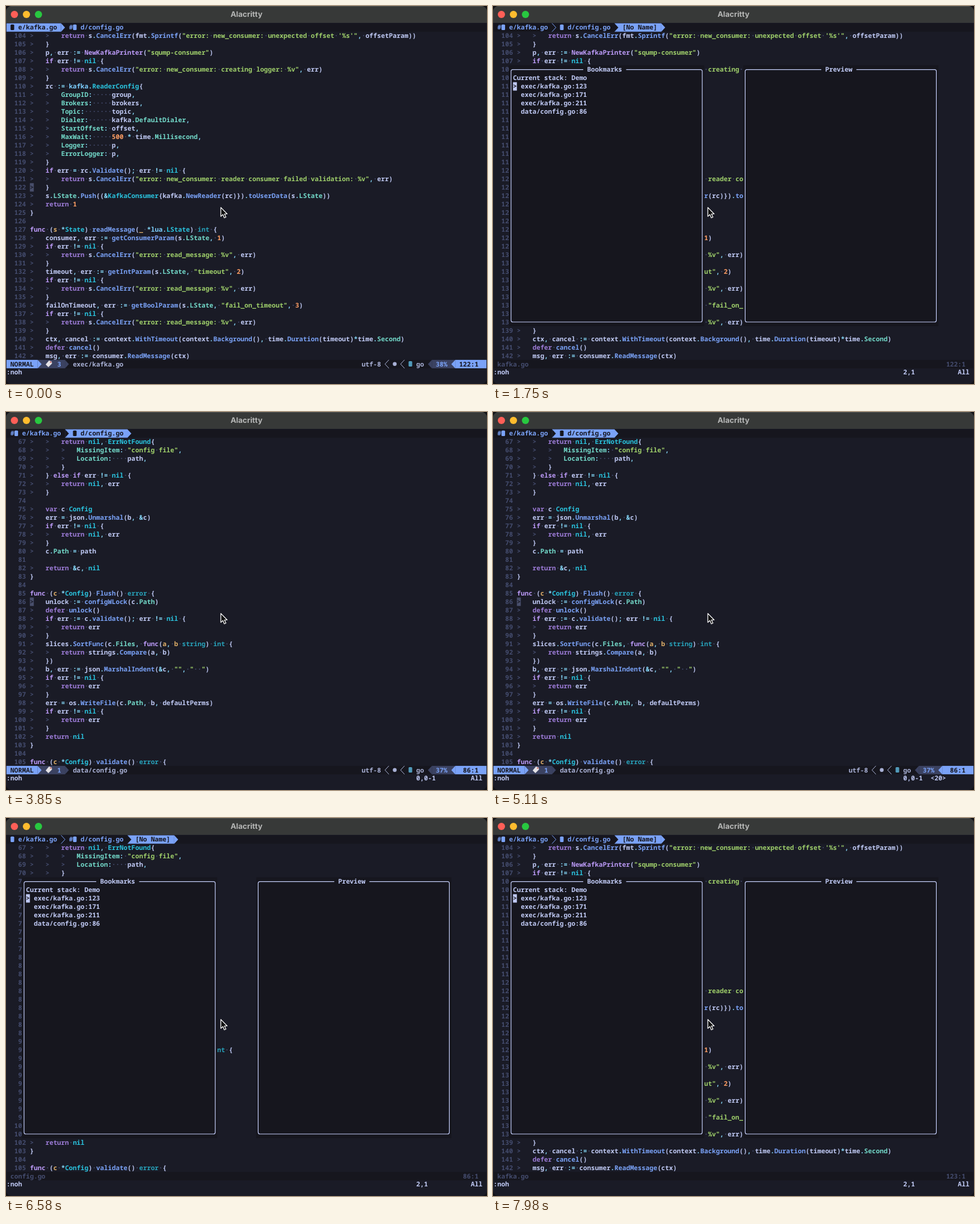
Recreate the animation shown at these times as an HTML page. Size 800x628 px, loop 8000 ms.

```html
<!DOCTYPE html>
<html lang="en">
<head>
<meta charset="utf-8">
<title>Terminal bookmarks</title>
<style>
html, body { margin: 0; width: 100%; height: 100%; overflow: hidden; background: #101014; }
svg { display: block; width: 800px; height: 628px; }
text { white-space: pre; text-rendering: geometricPrecision; }
#screen text { font: 600 10.817px "Noto Sans Mono", "DejaVu Sans Mono", monospace; }
#screen text.b { font-weight: 700; }
#title { font: 700 12.6px Inter, "Open Sans", sans-serif; }
</style>
</head>
<body>
<svg viewBox="0 0 800 628">
  <defs><clipPath id="win"><rect width="800" height="628" rx="9"/></clipPath></defs>
  <g clip-path="url(#win)">
    <rect width="800" height="628" fill="#1a1b26"/>
    <rect width="800" height="28" fill="#373938"/>
    <rect width="800" height="1" fill="#505251"/>
    <circle cx="14" cy="14" r="6" fill="#fe5f57"/>
    <circle cx="34" cy="14" r="6" fill="#febc2e"/>
    <circle cx="54" cy="14" r="6" fill="#28c840"/>
    <text id="title" x="400" y="18.4" text-anchor="middle" fill="#b6b7b6">Alacritty</text>
    <g id="screen"></g>
    <path d="M357.3 334.6V349.6L360.7 346.5L363.1 352L365.8 350.8L363.4 345.5H367.8Z"
      fill="#111" stroke="#fff" stroke-width="1.2" stroke-linejoin="round"/>
  </g>
</svg>
<script>
const CW = 6.49, LH = 13.98, X0 = 0.8, Y0 = 28.7;
const C = {
  bg: '#1a1b26', dark: '#16161e', fg: '#c0caf5', dim: '#3b4261', faint: '#444c6e', cursor: '#484e6b',
  blue: '#7aa2f7', magenta: '#bb9af7', purple: '#9d7cd8', green: '#9ece6a', orange: '#ff9e64',
  type: '#2ac3de', builtin: '#27a1b9', op: '#89ddff', prop: '#73daca',
  param: '#e0af68', module: '#7dcfff', bracket: '#c0caf5', bar: '#a9b1d6', icon: '#519aba'
};

const files = {
  kafka: {
    first: 104, tab: 0, path: 'exec/kafka.go', name: 'kafka.go', marks: 3, percent: '38%',
    code: String.raw`		return s.CancelErr(fmt.Sprintf("error: new_consumer: unexpected offset '%s'", offsetParam))
	}
	p, err := NewKafkaPrinter("sqump-consumer")
	if err != nil {
		return s.CancelErr("error: new_consumer: creating logger: %v", err)
	}
	rc := kafka.ReaderConfig{
		GroupID:     group,
		Brokers:     brokers,
		Topic:       topic,
		Dialer:      kafka.DefaultDialer,
		StartOffset: offset,
		MaxWait:     500 * time.Millisecond,
		Logger:      p,
		ErrorLogger: p,
	}
	if err = rc.Validate(); err != nil {
		return s.CancelErr("error: new_consumer: reader consumer failed validation: %v", err)
	}
	s.LState.Push((&KafkaConsumer{kafka.NewReader(rc)}).toUserData(s.LState))
	return 1
}

func (s *State) readMessage(_ *lua.LState) int {
	consumer, err := getConsumerParam(s.LState, 1)
	if err != nil {
		return s.CancelErr("error: read_message: %v", err)
	}
	timeout, err := getIntParam(s.LState, "timeout", 2)
	if err != nil {
		return s.CancelErr("error: read_message: %v", err)
	}
	failOnTimeout, err := getBoolParam(s.LState, "fail_on_timeout", 3)
	if err != nil {
		return s.CancelErr("error: read_message: %v", err)
	}
	ctx, cancel := context.WithTimeout(context.Background(), time.Duration(timeout)*time.Second)
	defer cancel()
	msg, err := consumer.ReadMessage(ctx)`
  },
  config: {
    first: 67, tab: 1, path: 'data/config.go', name: 'config.go', marks: 1, percent: '37%',
    code: String.raw`		return nil, ErrNotFound{
			MissingItem: "config file",
			Location:    path,
		}
	} else if err != nil {
		return nil, err
	}

	var c Config
	err = json.Unmarshal(b, &c)
	if err != nil {
		return nil, err
	}
	c.Path = path

	return &c, nil
}

func (c *Config) Flush() error {
	unlock := configWLock(c.Path)
	defer unlock()
	if err := c.validate(); err != nil {
		return err
	}
	slices.SortFunc(c.Files, func(a, b string) int {
		return strings.Compare(a, b)
	})
	b, err := json.MarshalIndent(&c, "", "  ")
	if err != nil {
		return err
	}
	err = os.WriteFile(c.Path, b, defaultPerms)
	if err != nil {
		return err
	}
	return nil
}

func (c *Config) validate() error {`
  }
};

// start ms, file, cursor line, popup row (0 = closed), ruler, right end of the command line
const steps = [
  [0, 'kafka', 122, 0, '', ''],
  [1120, 'kafka', 122, 0, '', '<20>'],
  [1260, 'kafka', 122, 2],
  [2170, 'kafka', 122, 3],
  [2940, 'kafka', 122, 4],
  [3150, 'kafka', 122, 5],
  [3850, 'config', 86, 0, '0,0-1', 'All'],
  [5110, 'config', 86, 0, '0,0-1', '<20>'],
  [5250, 'config', 86, 5],
  [6020, 'config', 86, 4],
  [6300, 'config', 86, 3],
  [6580, 'config', 86, 2],
  [6930, 'kafka', 123, 0, '0,0-1', 'All'],
  [7700, 'kafka', 123, 0, '0,0-1', '<20>'],
  [7840, 'kafka', 123, 2]
];
const LOOP = 8000;

const px = col => +(X0 + col * CW).toFixed(2);
const py = row => +(Y0 + row * LH).toFixed(2);
const esc = s => s.replace(/&/g, '&amp;').replace(/</g, '&lt;').replace(/>/g, '&gt;');

const text = (row, col, s, fill = C.fg, cls = '') =>
  `<text x="${px(col)}" y="${(py(row) + 10.6).toFixed(2)}" fill="${fill}" class="${cls}">${esc(s)}</text>`;
const fillRect = (x, y, w, h, fill, rx = 0) =>
  `<rect x="${x}" y="${y}" width="${w}" height="${h}" fill="${fill}" rx="${rx}"/>`;
const cells = (row, from, to, fill, rows = 1) =>
  fillRect(px(from), py(row), (CW * (to - from)).toFixed(2), LH * rows, fill);
// powerline wedge, dir 1 points right and -1 left
const wedgePath = (row, col, dir) => {
  const base = px(dir > 0 ? col : col + 1), tip = px(dir > 0 ? col + 1 : col);
  return `M${base} ${py(row)}L${tip} ${py(row) + LH / 2}L${base} ${py(row) + LH}`;
};
const wedge = (row, col, dir, fill) => `<path d="${wedgePath(row, col, dir)}Z" fill="${fill}"/>`;
const chevron = (row, col, dir, color) =>
  `<path d="${wedgePath(row, col, dir)}" fill="none" stroke="${color}"/>`;
const icon = (row, col, fill) => fillRect(px(col) + 0.3, py(row) + 2, 6, 9.2, fill, 1.5);

const keywords = {
  func: C.magenta, if: C.magenta, else: C.magenta, return: C.purple, defer: C.purple,
  var: C.purple, nil: C.type, int: C.builtin, error: C.builtin, string: C.builtin
};

function tokenColor(tok, before, after) {
  if (tok[0] === '"') return C.green;
  if (/^\d/.test(tok)) return C.orange;
  if (/^[()[\]{}]/.test(tok)) return C.bracket;
  if (!/^\w/.test(tok)) return C.op;
  if (keywords[tok]) return keywords[tok];
  if (/^(State|Config|KafkaConsumer|ReaderConfig|ErrNotFound)$/.test(tok) || /lua\.$/.test(before)) return C.type;
  if (/^\.(ReaderConfig|LState\))/.test(after) && /kafka|lua/.test(tok)) return C.module;
  if (after[0] === '(') return /^New/.test(tok) && !before.endsWith('.') ? C.magenta : C.blue;
  if (/func ?\([^)]*$/.test(before) || tok === '_') return C.param;
  if (before.endsWith('.') || /^:(?!=)/.test(after)) return C.prop;
  return C.fg;
}

function codeLine(row, line) {
  let out = '', col = 6;
  for (const m of line.matchAll(/\t|"[^"]*"|\w+| +|[^\w\s]/g)) {
    const tok = m[0];
    if (tok === '\t') {
      out += text(row, col, '>', C.faint);
      col += 4;
      continue;
    }
    const color = tokenColor(tok, line.slice(0, m.index), line.slice(m.index + tok.length));
    for (const part of tok.match(/ +|[^ ]+/g)) {
      out += part[0] === ' ' ? text(row, col, '·'.repeat(part.length), C.faint) : text(row, col, part, color);
      col += part.length;
    }
  }
  return out;
}

for (const f of Object.values(files)) {
  f.drawn = f.code.split('\n').map((line, i) =>
    text(i + 1, 2, String(f.first + i).padStart(3), C.faint) + codeLine(i + 1, line)).join('');
}

function tabLine(current, popup) {
  const tabs = ['e/kafka.go', 'd/config.go'].map((label, i) => ({
    label, active: !popup && i === current, alt: popup ? i === current : i !== current
  }));
  if (popup) tabs.push({ label: '[No Name]', active: true, plain: true });
  let out = cells(0, 0, 123, C.dark), col = 1;
  tabs.forEach((t, i) => {
    const end = col + (t.alt ? 1 : 0) + (t.plain ? 0 : 2) + t.label.length + 1;
    const ink = t.active ? C.dark : C.blue;
    if (t.active) {
      out += cells(0, i ? col - 2 : 0, end, C.blue) + wedge(0, end, 1, C.blue);
      if (i) out += wedge(0, col - 2, 1, C.dark);
    } else if (tabs[i + 1] && !tabs[i + 1].active) {
      out += chevron(0, end, 1, C.blue);
    }
    if (t.alt) out += text(0, col++, '#', ink, 'b');
    if (!t.plain) {
      out += icon(0, col, ink);
      col += 2;
    }
    out += text(0, col, t.label, ink, t.active ? 'b' : '');
    col = end + 2;
  });
  return out;
}

function statusLine(f, line, popup) {
  const r = 40, pos = `${line}:1`.padStart(5);
  let out = cells(r, 0, 123, C.dark);
  if (popup) return out + text(r, 1, f.name, C.faint) + text(r, 116, pos, C.faint);
  out += cells(r, 8, 15, C.dim) + wedge(r, 15, 1, C.dim) + cells(r, 0, 8, C.blue) + wedge(r, 8, 1, C.blue);
  out += text(r, 1, 'NORMAL', C.dark, 'b') + text(r, 13, String(f.marks), C.blue) + text(r, 17, f.path, C.bar);
  out += `<path d="M66 595.5L71.5 589L76 590.5L76.5 594L70.5 600Z" fill="#e4e2e6"/><circle cx="74.3" cy="591.6" r="1.2" fill="#c8564f"/>`;
  out += text(r, 91, 'utf-8', C.bar) + chevron(r, 97, -1, C.bar) + chevron(r, 101, -1, C.bar);
  out += `<circle cx="${px(99.5)}" cy="594.8" r="3.2" fill="${C.bar}"/>`;
  out += icon(r, 103, C.icon) + text(r, 105, 'go', C.bar);
  out += wedge(r, 108, -1, C.dim) + cells(r, 109, 115, C.dim) + text(r, 110, f.percent, C.blue);
  return out + wedge(r, 114, -1, C.blue) + cells(r, 115, 123, C.blue) + text(r, 116, pos, C.dark, 'b');
}

function floatBox(left, title, titleCol) {
  const x1 = px(left + 0.5), x2 = px(left + 49.5), y1 = py(5.5), y2 = py(35.5), k = 3;
  const t1 = px(titleCol - 1), t2 = px(titleCol + title.length + 1);
  return cells(5, left, left + 50, C.dark, 31) +
    `<path d="M${t1} ${y1}H${x1 + k}Q${x1} ${y1} ${x1} ${y1 + k}V${y2 - k}Q${x1} ${y2} ${x1 + k} ${y2}` +
    `H${x2 - k}Q${x2} ${y2} ${x2} ${y2 - k}V${y1 + k}Q${x2} ${y1} ${x2 - k} ${y1}H${t2}" ` +
    `fill="none" stroke="${C.fg}" stroke-width="1.2"/>` + text(5, titleCol, title);
}

function popupBoxes(sel) {
  const marks = ['exec/kafka.go:123', 'exec/kafka.go:171', 'exec/kafka.go:211', 'data/config.go:86'];
  return floatBox(4, 'Bookmarks', 24) + floatBox(64, 'Preview', 85) +
    text(6, 5, 'Current stack: Demo') + marks.map((m, i) => text(7 + i, 7, m)).join('') +
    cells(sel + 5, 5, 6, C.fg) + text(sel + 5, 5, '>', C.dark);
}

function draw([, key, line, popup, ruler, tail]) {
  const f = files[key], row = line - f.first + 1;
  let out = tabLine(f.tab, popup) + f.drawn + statusLine(f, line, popup);
  out += popup ? popupBoxes(popup) : cells(row, 6, 7, C.cursor) + text(row, 6, '>', C.bg);
  out += text(41, 0, ':noh') + text(41, 105, popup ? `${popup},1` : ruler);
  const end = popup ? 'All' : tail;
  return out + text(41, end === 'All' ? 119 : 112, end);
}

const screen = document.getElementById('screen');
const start = performance.now();
let shown = null;

function tick(now) {
  const t = Math.max(0, now - start) % LOOP;
  const step = steps.findLast(s => s[0] <= t);
  if (step !== shown) {
    shown = step;
    screen.innerHTML = draw(step);
  }
  requestAnimationFrame(tick);
}
tick(start);
</script>
</body>
</html>
```
